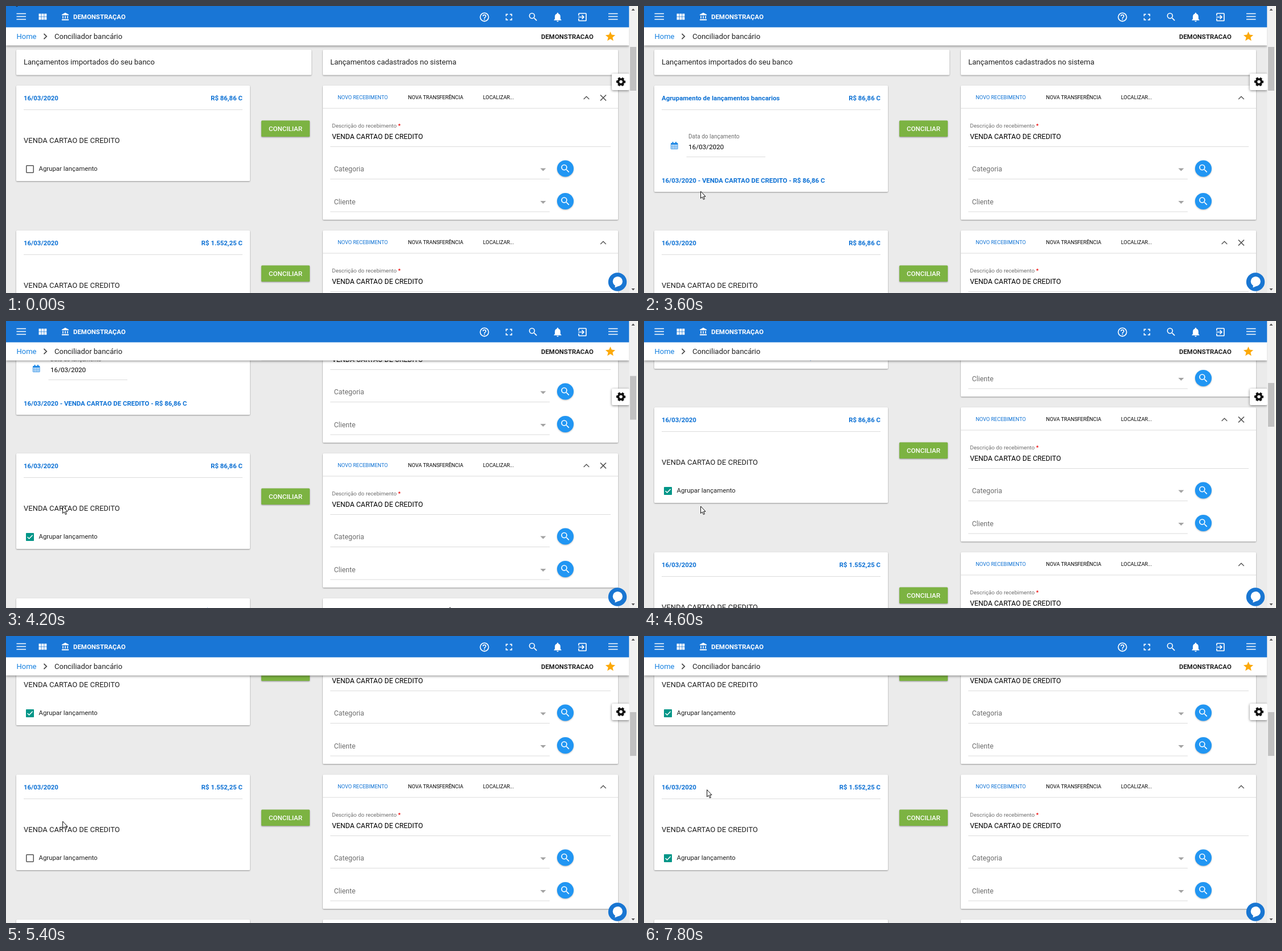
Animation, 1109 px wide and 505 px high, one loop 8 s. Source, as an HTML page:

```html
<!DOCTYPE html>
<html lang="pt-BR">
<head>
<meta charset="utf-8">
<style>
html, body { margin: 0; width: 100%; height: 100%; overflow: hidden; background: #ebebeb; }
svg { display: block; font-family: Roboto, sans-serif; }
.card { fill: #fff; filter: drop-shadow(0 1px 1.2px rgba(0,0,0,.38)); }
.bar { filter: drop-shadow(0 1px 2px rgba(0,0,0,.5)); }
</style>
</head>
<body>
<svg id="stage" width="1109" height="505" viewBox="0 0 1109 505"></svg>
<script>
const BLUE = '#0b70d4', INK = '#212121', GREY = '#6e6e6e';

const icons = {
  search: 'M15.5 14h-.79l-.28-.27A6.47 6.47 0 0 0 16 9.5 6.5 6.5 0 1 0 9.5 16c1.61 0 3.09-.59 4.23-1.57l.27.28v.79l5 4.99L20.49 19l-4.99-5zm-6 0a4.5 4.5 0 1 1 0-9 4.5 4.5 0 0 1 0 9z',
  grid: 'M4 11h5V5H4zM4 18h5v-6H4zM10 18h5v-6h-5zM16 18h5v-6h-5zM10 11h5V5h-5zM16 5v6h5V5z',
  bank: 'M4 10v7h2.4v-7zM10.3 10v7h2.4v-7zM2 22h19v-3H2zM16.6 10v7H19v-7zM11.5 1 2 6v2h19V6z',
  help: 'M11 18h2v-2h-2zM12 2a10 10 0 1 0 0 20 10 10 0 1 0 0-20zm0 18a8 8 0 1 1 0-16 8 8 0 1 1 0 16zm0-14a4 4 0 0 0-4 4h2a2 2 0 1 1 4 0c0 2-3 1.75-3 5h2c0-2.25 3-2.5 3-5a4 4 0 0 0-4-4z',
  full: 'M7 14H5v5h5v-2H7zM5 10h2V7h3V5H5zM17 17h-3v2h5v-5h-2zM14 5v2h3v3h2V5z',
  bell: 'M12 22a2 2 0 0 0 2-2h-4a2 2 0 0 0 2 2zm6-6v-5c0-3.07-1.64-5.64-4.5-6.32V4a1.5 1.5 0 0 0-3 0v.68C7.63 5.36 6 7.92 6 11v5l-2 2v1h16v-1z',
  exit: 'M10.09 15.59 11.5 17l5-5-5-5-1.41 1.41L12.67 11H3v2h9.67zM19 3H5a2 2 0 0 0-2 2v4h2V5h14v14H5v-4H3v4a2 2 0 0 0 2 2h14a2 2 0 0 0 2-2V5a2 2 0 0 0-2-2z',
  star: 'M12 17.27 18.18 21l-1.64-7.03L22 9.24l-7.19-.61L12 2 9.19 8.63 2 9.24l5.46 4.73L5.82 21z'
};

const icon = (name, cx, cy, fill = '#fff', s = .8125) =>
  `<path d="${icons[name]}" fill="${fill}" transform="translate(${cx - 12 * s} ${cy - 12 * s}) scale(${s})"/>`;
const text = (s, x, y, size, fill = INK, weight = 400, anchor = 'start') =>
  `<text x="${x}" y="${y}" font-size="${size}" fill="${fill}" font-weight="${weight}" text-anchor="${anchor}">${s}</text>`;
const rect = (x, y, w, h, fill, extra = '') =>
  `<rect x="${x}" y="${y}" width="${w}" height="${h}" fill="${fill}" ${extra}/>`;
const card = (x, y, w, h) => rect(x, y, w, h, '#fff', 'rx="1.5" class="card"');
const rule = (x, y, w) => rect(x, y, w, 1, '#dcdcdc');
const line = (d, color, width) =>
  `<path d="${d}" fill="none" stroke="${color}" stroke-width="${width}"/>`;
const menu = x => line(`M${x} 13.5h16.5m-16.5 5h16.5m-16.5 5h16.5`, '#fff', 1.6);
const group = (id, body, y = 0) => `<g id="${id}" transform="translate(0 ${y})">${body}</g>`;

function checkbox(id, on) {
  return rect(35.8, 140.8, 12.4, 12.4, 'none', 'stroke="#555" stroke-width="1.5" rx="1"') +
    `<g id="${id}" visibility="${on ? 'visible' : 'hidden'}">` +
    rect(35, 140, 14, 14, '#009688', 'rx="1.2"') +
    line('M37.6 147l3 3 6-6.2', '#fff', 1.5) + '</g>';
}

function entry(id, value, on) {
  return card(18, 0, 410, 168) +
    text('16/03/2020', 31, 25.5, 11.4, BLUE, 700) +
    text(`R$ ${value} C`, 415, 25.5, 11.4, BLUE, 700, 'end') +
    rule(31, 42, 384) +
    text('VENDA CARTAO DE CREDITO', 31, 100.5, 13) +
    checkbox(id, on) +
    text('Agrupar lançamento', 57.5, 150, 11.4);
}

function calendar(x, y) {
  let s = rect(x, y + 2, 12.5, 11, '#1e88e5', 'rx="1"') +
    rect(x + 2.5, y, 2, 4, '#1e88e5') + rect(x + 8, y, 2, 4, '#1e88e5');
  for (let i = 0; i < 12; i++)
    s += rect(x + 1 + i % 4 * 2.8, y + 5 + (i >> 2) * 2.6, 2.1, 1.9, '#fff');
  return s;
}

function summary() {
  return card(18, 0, 410, 187) +
    text('Agrupamento de lançamentos bancarios', 31, 25.5, 11.4, BLUE, 700) +
    text('R$ 86,86 C', 415, 25.5, 11.4, BLUE, 700, 'end') +
    rule(31, 42, 384) + calendar(47, 99) +
    text('Data do lançamento', 78, 92.5, 10, GREY) +
    text('16/03/2020', 78, 111.5, 11.7, '#000') +
    rule(74.5, 125, 138.5) +
    text('16/03/2020 - VENDA CARTAO DE CREDITO - R$ 86,86 C', 31, 170.5, 11.4, BLUE, 700);
}

function picker(label, y) {
  return text(label, 575.5, y + 5, 12.3, GREY) + rule(569, y + 18, 385) +
    `<path d="M937.5 ${y - .5}h10l-5 5z" fill="#a3a3a3"/>` +
    `<circle cx="981.5" cy="${y}" r="14.6" fill="#2196f3" class="bar" style="filter:drop-shadow(0 1px 1px rgba(0,0,0,.25))"/>` +
    icon('search', 981.5, y);
}

function panel(closable) {
  const caret = closable ? 1018.5 : 1048;
  return rect(448, 61.5, 85, 28.5, '#7cb342', 'rx="1.5" class="card" style="fill:#7cb342"') +
    text('CONCILIAR', 490.5, 79.7, 11.5, '#fff', 500, 'middle') +
    card(556, 0, 518, 236) +
    text('NOVO RECEBIMENTO', 582, 24, 9.12, BLUE) +
    text('NOVA TRANSFERÊNCIA', 705.5, 24, 9.12, '#000') +
    text('LOCALIZAR...', 837, 24, 9.12, '#000') +
    line(`M${caret - 4.8} 24l4.8-4.8 4.8 4.8`, '#555', 1.4) +
    (closable ? line('M1043 16.5l10 10m0-10l-10 10', '#555', 1.7) : '') +
    rule(556, 39.5, 518) +
    text('Descrição do recebimento <tspan fill="#e00" font-weight="700">*</tspan>', 572, 74, 9.75, GREY) +
    text('VENDA CARTAO DE CREDITO', 572, 94.3, 12.3, '#000') +
    rule(569, 107, 492) +
    picker('Categoria', 146) + picker('Cliente', 203.5);
}

const row = (i, left, closable) => group('', left + panel(closable), 140 + 255 * i);

const titles = card(18, 77, 518, 44.5) + card(556, 77, 518, 44.5) +
  text('Lançamentos importados do seu banco', 31, 103, 13) +
  text('Lançamentos cadastrados no sistema', 569, 103, 13);

const before = row(0, entry('firstCheck', '86,86'), true) +
  row(1, entry('', '1.552,25'), false);
const after = row(0, summary(), false) +
  row(1, entry('', '86,86', true), true) +
  row(2, entry('lastCheck', '1.552,25'), false) +
  row(3, entry('', '1.552,25'), false);

const header = rect(0, 37, 1093.5, 32.5, '#fff', 'class="bar"') +
  rect(0, 0, 1093.5, 37.5, '#1976d6') +
  menu(18.5) + icon('grid', 64, 19.3) + icon('bank', 104.3, 18.8, '#fff', .64) +
  text('DEMONSTRAÇAO', 118, 22.8, 11.45, '#fff', 700) +
  icon('help', 839.5, 19.5) + icon('full', 882.5, 19.5) + icon('search', 925, 19.3) +
  icon('bell', 968, 19.5) + icon('exit', 1011.5, 19.5) + menu(1057) +
  text('Home', 18.5, 57.7, 13, '#1580e0') +
  line('M66.5 48.8l4.7 4.7-4.7 4.7', '#444', 1.7) +
  text('Conciliador bancário', 85, 57.7, 13) +
  text('DEMONSTRACAO', 939, 57.7, 11.45, INK, 700) +
  icon('star', 1060.5, 53.5, '#fca90a', .86);

const overlay = rect(1063, 119, 31, 29, '#fff', 'rx="2" class="bar"') +
  '<g fill="none" stroke="#111" transform="translate(1079 133.3)"><circle r="4.6" stroke-width="3.6"/>' +
  '<circle r="6.8" stroke-width="2.6" stroke-dasharray="4 3.12" stroke-dashoffset="2"/></g>' +
  rect(1093.5, 0, 14, 505, '#f1f1f1') + rect(1107.5, 0, 1.5, 505, '#fffff0') +
  '<path d="M1097.5 8l3-3.5 3 3.5zM1097.5 497l3 3.5 3-3.5z" fill="#505050"/>' +
  rect(1095, 72, 11, 77, '#c1c1c1', 'id="thumb"') +
  '<circle cx="1073" cy="485.5" r="16.2" fill="#1976d2"/>' +
  '<circle cx="1073.3" cy="484.5" r="8.6" fill="#fff"/><path d="M1069 490l-.5 5.5 7-3z" fill="#fff"/>';

const pointer = '<g id="cursor" fill="#fff" stroke="#111" stroke-width="1" stroke-linejoin="round">' +
  '<path id="arrow" d="M.5.5V13L3.4 10.4 5.4 15 7.4 14.1 5.4 9.7H9z"/>' +
  '<path id="hand" d="M-1 11.5V1.5a1.5 1.5 0 0 1 3 0V7q2.4-.9 2.8.5 2-.6 2.5.8 2.2-.4 2.2 1.6v3.6q0 2-1.6 5.3H.6Q-.8 16-4 12q-.8-2 .8-1.9z"/></g>';

document.getElementById('stage').innerHTML = rect(0, 0, 1109, 505, '#ebebeb') +
  group('page', titles + group('before', before) + group('after', after)) +
  header + overlay + pointer;

// time, x, y of the pointer's hot spot
const path = [
  [200, 13, -14], [800, 368, 260], [1100, 300, 371], [1700, 47, 292], [1800, 44, 290],
  [2800, 44, 290], [3300, 99, 323], [3400, 99, 323], [3600, 99, 325.5], [5600, 99, 325.5],
  [6500, 41, 389], [6600, 39, 389], [7100, 39, 389], [7600, 110, 271], [7700, 110, 271], [7800, 110, 270]
];
const wheel = [3800, 4200, 4600, 5200, 5400];

function pointerAt(t) {
  const i = path.findIndex(k => k[0] > t);
  if (i < 0) return path[path.length - 1].slice(1);
  if (!i) return path[0].slice(1);
  const a = path[i - 1], b = path[i], f = (t - a[0]) / (b[0] - a[0]);
  return [1, 2].map(n => a[n] + (b[n] - a[n]) * f);
}

const el = id => document.getElementById(id);
const move = (id, x, y) => el(id).setAttribute('transform', `translate(${x} ${y})`);
const show = (id, on) => el(id).setAttribute('visibility', on ? 'visible' : 'hidden');
const toggle = (id, on) => { el(id).style.display = on ? '' : 'none'; };

function draw(now) {
  const t = Math.floor(now % 8000 / 100) * 100;
  const scroll = Math.floor(81.2 * wheel.filter(w => w <= t).length);
  const overBox = t >= 1700 && t < 2900 || t >= 6400 && t < 7200;
  move('page', 0, -scroll);
  move('thumb', 0, scroll * .1525);
  move('cursor', ...pointerAt(t));
  toggle('before', t < 2600);
  toggle('after', t >= 2600);
  show('firstCheck', t >= 2500);
  show('lastCheck', t >= 7100);
  toggle('hand', overBox);
  toggle('arrow', !overBox);
  requestAnimationFrame(draw);
}
requestAnimationFrame(draw);
</script>
</body>
</html>
```
